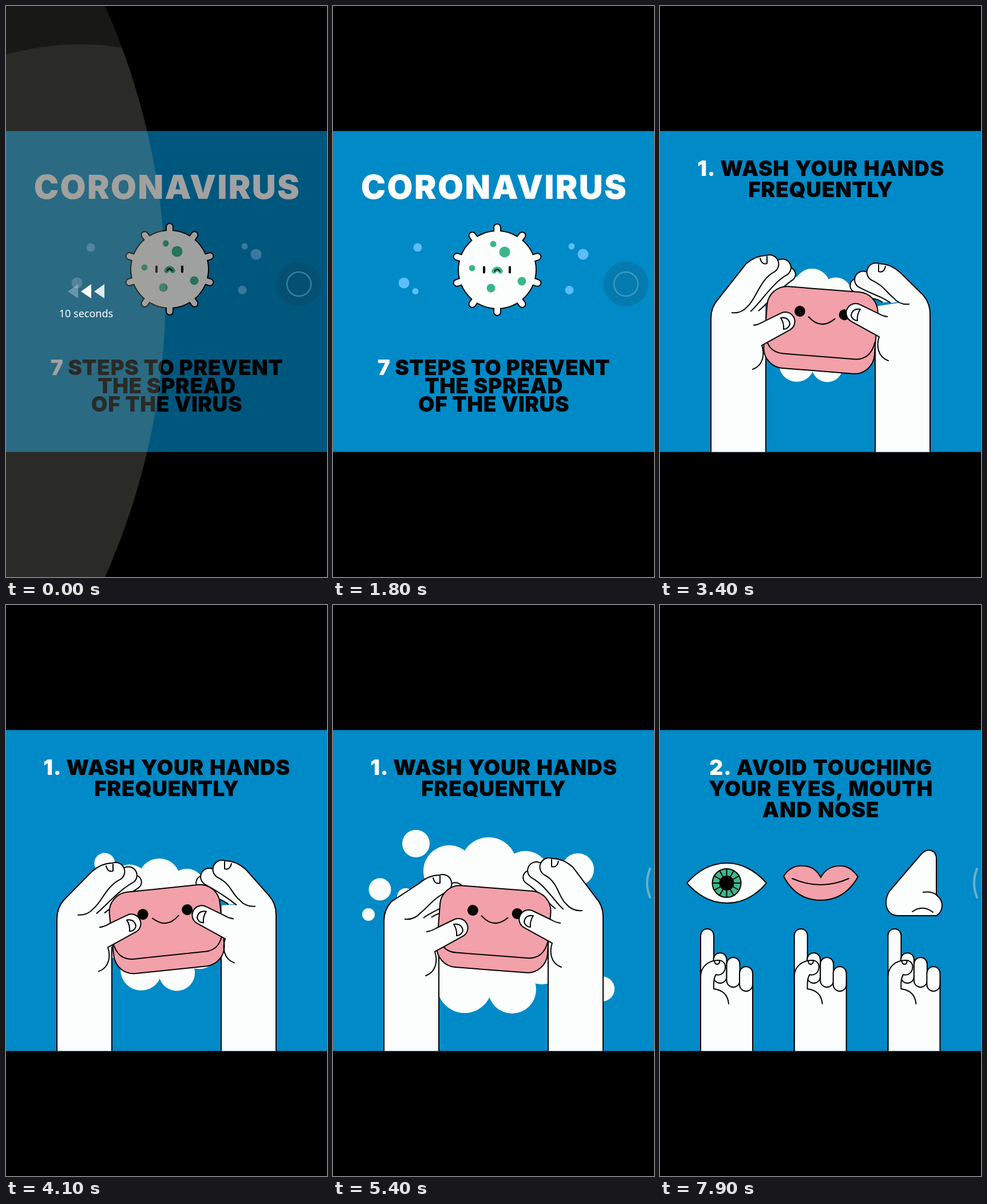
Write an HTML page that moves like this. It is 561 px wide and 998 px high and loops after 8 s.

```html
<!DOCTYPE html>
<html lang="en">
<head>
<meta charset="utf-8">
<title>Prevention steps</title>
<style>
  html, body { margin: 0; width: 100%; height: 100%; overflow: hidden; background: #000; }
  svg { display: block; width: 561px; height: 998px; }
  .ink { fill: none; stroke: #000; stroke-width: 2; stroke-linecap: round; stroke-linejoin: round; }
  .skin { fill: #fcfefd; stroke: #000; stroke-width: 2; stroke-linejoin: round; }
  .pink { fill: #f2a0a9; stroke: #000; stroke-width: 2; }
  .white { fill: #fcfefd; }
  .green { fill: #3cb78a; }
  .head { font: 900 37px Inter, "Open Sans", sans-serif; text-anchor: middle; letter-spacing: .75px; word-spacing: 2px; }
  #intro .head { letter-spacing: .6px; word-spacing: 0; }
  #intro .big { font-size: 58px; letter-spacing: 2.4px; fill: #fff; }
  .note { font: 18px "Noto Sans", Roboto, sans-serif; text-anchor: middle; fill: #fff; }
</style>
</head>
<body>
<svg viewBox="0 0 561 998">
  <defs>
    <clipPath id="video"><rect y="218.500" width="561" height="561"/></clipPath>
    <clipPath id="side"><circle cx="-949" cy="499" r="1228"/></clipPath>
    <g id="pointer">
      <path class="white" d="M71 781V640H94L162 655V781Z"/>
      <path class="skin" d="M71 781V577.500a11.500 11.500 0 0 1 23 0V650"/>
      <path class="ink" d="M162 655V781"/>
      <rect class="skin" x="93.500" y="608" width="23" height="53" rx="11.500"/>
      <rect class="skin" x="116.500" y="616" width="23" height="52" rx="11.500"/>
      <rect class="skin" x="139" y="632" width="23" height="43" rx="11.500"/>
      <path class="white" d="M73 645L94 640V672L73 690Z"/>
      <path class="skin" d="M71 650C71 632 84 622 100 621C110 620 115 627 114 634C113 644 105 648 98 646Q93 652 94 671"/>
      <path class="ink" d="M71 640V781M95 622Q96 628 100 628Q105 627 104 621M94 671Q118 674 120 697"/>
    </g>
  </defs>

  <rect width="561" height="998" fill="#000"/>
  <g clip-path="url(#video)">
    <rect y="218" width="561" height="562" fill="#008ac7"/>

    <g id="intro">
      <text class="head big" x="282" y="337">CORONAVIRUS</text>
      <g id="motes" fill="#5cbdfb"></g>
      <g id="virus">
        <g id="spikes" stroke-linecap="round"></g>
        <g class="green">
          <circle cx="13" cy="-31" r="9.500"/><circle cx="-7" cy="-45" r="5.500"/>
          <circle cx="-44" cy="-3" r="5.500"/><circle cx="-11" cy="32" r="7.500"/>
          <circle cx="43" cy="20" r="7.500"/>
        </g>
        <path d="M-23 -4.500V4.500M22 -4.500V4.500" stroke="#000" stroke-width="4" stroke-linecap="round"/>
        <path d="M-5.500 2.500Q0 -5 5.500 2.500" fill="none" stroke="#3cb78a" stroke-width="8.500" stroke-linecap="round"/>
        <path class="ink" d="M-4.500 2.500Q0 -4 4.500 2.500"/>
      </g>
      <text class="head" x="281" y="645"><tspan fill="#fff">7</tspan> STEPS TO PREVENT</text>
      <text class="head" x="281" y="677">THE SPREAD</text>
      <text class="head" x="281" y="709">OF THE VIRUS</text>
    </g>

    <g id="wash">
      <text class="head" x="281" y="297"><tspan fill="#fff">1.</tspan> WASH YOUR HANDS</text>
      <text class="head" x="281" y="334">FREQUENTLY</text>
      <g id="rise">
        <g id="foam" class="white"></g>
        <g id="backL"></g>
        <g id="backR" transform="translate(561 0) scale(-1 1)"></g>
        <g id="soap">
          <rect class="pink" x="-97" y="-71" width="194" height="143" rx="35"/>
          <path class="ink" d="M-96 14C-93 33 -83 46.500 -62 46.500H62C83 46.500 93 33 96 14"/>
          <circle cx="-39" cy="-29.500" r="9.500"/><circle cx="39" cy="-29.500" r="9.500"/>
          <path class="ink" d="M-23 -21Q0 1 23 -21"/>
        </g>
        <g id="thumbL"></g>
        <g id="thumbR"></g>
      </g>
    </g>

    <g id="touch">
      <text class="head" x="281" y="297"><tspan fill="#fff">2.</tspan> AVOID TOUCHING</text>
      <text class="head" x="281" y="334">YOUR EYES, MOUTH</text>
      <text class="head" x="281" y="371">AND NOSE</text>
      <g id="eye">
        <path class="skin" d="M47 486C69 461 94 451 117 451S165 462 186 486C165 511 140 521 117 521S69 511 47 486Z"/>
        <circle class="green" cx="116.500" cy="486" r="25" stroke="#000" stroke-width="2"/>
        <g id="spokes" class="ink"></g>
        <circle cx="116.500" cy="486" r="13"/>
      </g>
      <g id="lips">
        <path class="pink" d="M216 474C226 459 238 455 250 456C266 456 275 465 281 476C287 465 298 456 314 456C326 455 336 461 346 475C330 503 308 516 281 516C252 516 230 501 216 474Z"/>
        <path class="ink" d="M231 478Q281 500 330 478"/>
      </g>
      <g id="nose">
        <path class="skin" d="M416 543C401 543 395 531 395 520Q395 508 402 499L456 436Q465 426 475 429.500Q483 433 483 443V507Q493 514 493 526Q492 538 483 543Z"/>
        <path class="ink" d="M460 502Q475 500 484 507M441 536Q459 523 477 537"/>
      </g>
      <use href="#pointer" class="point"/>
      <use href="#pointer" class="point"/>
      <use href="#pointer" class="point"/>
    </g>
  </g>

  <g id="seek">
    <rect width="561" height="998" fill="#000" opacity=".37"/>
    <g clip-path="url(#side)" fill="#a0a096">
      <rect width="300" height="998" opacity=".15"/>
      <circle id="ripple" cx="130" cy="546" r="478" opacity=".13"/>
    </g>
    <g fill="#fff">
      <path class="arrow" d="M108 499L126 486V511Z"/>
      <path class="arrow" d="M131 499L149 486V511Z"/>
      <path class="arrow" d="M154 499L172 486V511Z"/>
    </g>
    <text class="note" x="140" y="544">10 seconds</text>
  </g>

  <g id="ball">
    <circle cx="512" cy="486" r="39" fill="#1e323c" opacity=".18"/>
    <circle cx="512" cy="486" r="21" fill="none" stroke="#96dcf0" stroke-width="2.500" opacity=".34"/>
  </g>
  <path id="tab" d="M554 461Q544 486 554 511" fill="none" stroke="#6eaec9" stroke-width="4" stroke-linecap="round"/>
</svg>

<script>
const LOOP = 8000, WASH = 2000, TOUCH = 5700, ROCK = 850;
const $ = id => document.getElementById(id);
const clamp = v => Math.max(0, Math.min(1, v));
const span = (t, start, length) => clamp((t - start) / length);
const easeOut = p => 1 - (1 - p) ** 3;
const easeInOut = p => p < .5 ? 2 * p * p : 1 - 2 * (1 - p) ** 2;
const show = (id, on) => $(id).style.display = on ? '' : 'none';
const move = (el, x, y, rest = '') => el.setAttribute('transform', `translate(${x} ${y}) ${rest}`);
const scaleAt = (el, x, y, k) => move(el, x, y, `scale(${k}) translate(${-x} ${-y})`);
const circles = list => list.map(([x, y, r]) => `<circle cx="${x}" cy="${y}" r="${r}"/>`).join('');

// Straight lines radiating from a point.
function rays(count, cx, cy, inner, outer) {
  let d = '';
  for (let i = 0; i < count; i++) {
    const a = i / count * 2 * Math.PI, s = Math.sin(a), c = -Math.cos(a);
    d += `M${cx + inner * s} ${cy + inner * c}L${cx + outer * s} ${cy + outer * c}`;
  }
  return d;
}

$('motes').innerHTML = circles([
  [148, 422, 7.5], [124, 484, 9.5], [144, 498.500, 5.5],
  [417, 420, 5.5], [437, 434, 9.5], [413, 496.500, 7.5]]);

const spikes = rays(10, 0, 0, 60, 74);
$('spikes').innerHTML =
  `<path d="${spikes}" stroke="#000" stroke-width="14"/><circle r="69"/>
   <circle r="67" class="white"/><path d="${spikes}" stroke="#fcfefd" stroke-width="10"/>`;

$('spokes').innerHTML = `<path d="${rays(12, 116.5, 486, 13, 25)}"/>`;

// Foam at full size: the cloud first, then loose bubbles.
$('foam').innerHTML = circles([
  [203, 465, 45], [272, 455, 49], [336, 473, 43], [230, 665, 48], [313, 672, 42],
  [365, 619, 44], [196, 586, 60], [281, 566, 90],
  [145, 417, 24], [428, 462, 28], [82, 497, 19.5], [62, 541, 11],
  [470, 671, 22], [127, 510, 15]]);

// A bent finger from its base over the tip (x, y, radius r) back to the lower end (ex, ey).
function finger(base, x, y, r, ex, ey, hook = '') {
  return `<path class="skin" d="${base}L${x - 40} ${y - 1}Q${x - 23} ${y - r} ${x - 4} ${y - r}
    A${r} ${r} 0 0 1 ${x + r * .6} ${y + r * .8}
    C${x - 15} ${y + 25} ${ex + 14} ${ey - 11} ${ex} ${ey}${hook}"/>`;
}

// press shifts the knuckles, curl moves the two rear fingers.
function handBack(x, y, press, curl) {
  const top = 548 + press / 2, knuckle = 540 + press;
  const rear = `M112 ${top - 25}`;
  const front = `M89 ${top}Q89 ${top - 20} 102 ${top - 34}`;
  return `<path class="white" d="M89 781V${top}L125 ${knuckle - 5}L184 525L185 781Z"/>` +
    finger(rear, x + 33, y + 21 + 3 * curl, 12, 172, knuckle - 3) +
    finger(rear, x + 22, y + 10 + 4 * curl, 15, 158, knuckle - 2) +
    finger(front, x, y, 16, 153, knuckle - 11, `Q142 ${knuckle + 2} 125 ${knuckle}`) +
    `<path class="ink" d="M${x - 15} ${y - 11}Q${x - 12} ${y + 1} ${x - 3} ${y - 2}L${x - 3} ${y - 14}"/>
     <path class="ink" d="M89 ${top}V781M185 598V781"/>`;
}

const thumb =
  `<path class="white" d="M162 563L200 546L210 577L177 599L150 610Z"/>
   <path class="skin" d="M163 562Q172 561 180 556L211 541A16.500 16.500 0 0 1 227 570L178 597"/>
   <path class="ink" d="M211 549Q225 547 227 560Q225 568 216 569Q217 558 211 549ZM178 597C183 612 181 632 162 639"/>`;
$('thumbL').innerHTML = $('thumbR').innerHTML = thumb;

function drawIntro(t) {
  const sway = 3.5 * Math.cos(t / 800 * Math.PI);
  move($('virus'), 289.5 - sway, 463.5 - sway);
}

function drawWash(t) {
  const a = (t - 2700) / ROCK * 2 * Math.PI, c = Math.cos(a), s = Math.sin(a);
  const press = 4.5 - 4.5 * c + 7.2 * s;
  move($('rise'), 0, 340 * (1 - easeOut(span(t, WASH, 500))));
  move($('soap'), 281, 566, `rotate(${10 * c})`);
  scaleAt($('foam'), 255, 555, Math.exp((t - 5400) * .00022));
  $('backL').innerHTML = handBack(190, 475.5 - 12.5 * c + 20 * s, press, s);
  $('backR').innerHTML = handBack(182, 461.4 + 2.6 * c - 4 * s, press - 15, -s);
  move($('thumbL'), 0, press);
  move($('thumbR'), 561, press - 15, 'scale(-1 1)');
}

const icons = [['eye', 117, 486], ['lips', 281, 486], ['nose', 444, 486]];
const pointers = document.querySelectorAll('.point');

function drawTouch(t) {
  for (const [id, x, y] of icons) scaleAt($(id), x, y, easeOut(span(t, TOUCH, 300)));
  pointers.forEach((el, i) => {
    const p = easeInOut(span(t, 6000 + 370 * i, 550));
    move(el, 163.7 * i, 215 * (1 - p));
  });
}

const arrows = document.querySelectorAll('.arrow');

function drawControls(t) {
  show('seek', t < 500);
  $('seek').setAttribute('opacity', 1 - span(t, 80, 420));
  $('ripple').setAttribute('r', 478 + t);
  arrows.forEach((el, i) => {
    const level = [.3, 1, .85][(i + Math.floor(t / 200)) % 3];
    el.setAttribute('opacity', level);
  });
  move($('ball'), 100 * easeInOut(span(t, 2900, 350)), 0);
  move($('tab'), 20 * (1 - easeOut(span(t, 4200, 250))), 0);
}

function draw(t) {
  const scene = t < WASH ? 'intro' : t < TOUCH ? 'wash' : 'touch';
  for (const id of ['intro', 'wash', 'touch']) show(id, id === scene);
  ({ intro: drawIntro, wash: drawWash, touch: drawTouch })[scene](t);
  drawControls(t);
}

const start = performance.now();
function tick() {
  draw((performance.now() - start) % LOOP);
  requestAnimationFrame(tick);
}
tick();
</script>
</body>
</html>
```
